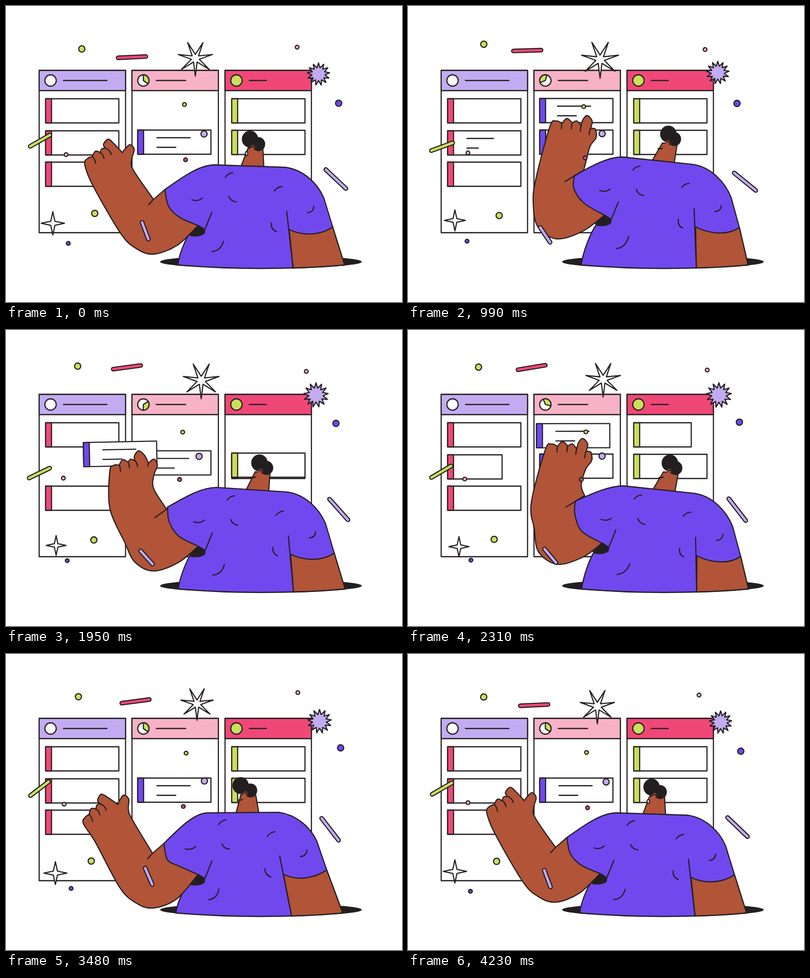
Recreate the animation shown at these times as an HTML page with a canvas. Size 800x600 px, loop 4.26 s.

```html
<!DOCTYPE html>
<html lang="en">
<head>
<meta charset="utf-8">
<title>Task board</title>
<style>
html, body { margin: 0; width: 100%; height: 100%; overflow: hidden; background: #fff; }
canvas { display: block; }
</style>
</head>
<body>
<canvas id="stage" width="800" height="600"></canvas>
<script>
const ctx = document.getElementById('stage').getContext('2d');
const INK = '#231f20', LILAC = '#c3abf2', PINK = '#f7b2c7', RED = '#ef4877',
      GREEN = '#c9df5c', PURPLE = '#7148ee', SKIN = '#b15438', WHITE = '#fff';
const LOOP = 4260, LINE = 2.3, DEG = Math.PI / 180;

const clamp = v => Math.min(1, Math.max(0, v));
const ramp = (t, a, b) => clamp((t - a) / (b - a));
const smooth = (t, a, b) => { const u = ramp(t, a, b); return u * u * (3 - 2 * u); };

// ---- drawing helpers ----
function paint(fill, stroke = true) {
  if (fill) { ctx.fillStyle = fill; ctx.fill(); }
  if (stroke) ctx.stroke();
}
function line(x1, y1, x2, y2) {
  ctx.beginPath(); ctx.moveTo(x1, y1); ctx.lineTo(x2, y2); ctx.stroke();
}
function arc(x1, y1, cx, cy, x2, y2) {
  ctx.beginPath(); ctx.moveTo(x1, y1); ctx.quadraticCurveTo(cx, cy, x2, y2); ctx.stroke();
}
function box(x, y, w, h, fill) {
  ctx.beginPath(); ctx.rect(x, y, w, h); paint(fill);
}
function oval(x, y, rx, ry, fill, stroke) {
  ctx.beginPath(); ctx.ellipse(x, y, rx, ry, 0, 0, 7); paint(fill, stroke);
}
function spline(pts, corners, fill) {
  const n = pts.length, at = i => pts[(i + n) % n], sharp = i => corners.includes(i % n);
  ctx.beginPath();
  ctx.moveTo(...pts[0]);
  for (let i = 0; i < n; i++) {
    const p = at(i), q = at(i + 1);
    const o = sharp(i) ? p : at(i - 1), r = sharp(i + 1) ? q : at(i + 2);
    ctx.bezierCurveTo(p[0] + (q[0] - o[0]) / 6, p[1] + (q[1] - o[1]) / 6,
                      q[0] - (r[0] - p[0]) / 6, q[1] - (r[1] - p[1]) / 6, ...q);
  }
  ctx.closePath();
  paint(fill);
}

// ---- board ----
function card(x, y, color, w = 148, h = 49, len1 = 0, len2 = 0, indent = 39) {
  if (w < 2 || h < 2) return;
  box(x, y, w, h, WHITE);
  box(x, y, Math.min(12, w), h, color);
  if (len1 > 1) line(x + indent, y + 15.5, x + indent + len1, y + 15.5);
  if (len2 > 1) line(x + indent, y + 35, x + indent + len2, y + 35);
}

function panel(x, color, lineEnd) {
  box(x, 130.5, 174.5, 329, WHITE);
  box(x, 130.5, 174.5, 41, color);
  line(x + 49, 151, lineEnd, 151);
}

// A card carried from the first column to the second, later pushed down and collapsed
function traveller(age, slide, shrink, collapse, indent, grows) {
  const lift = ramp(age, 0, 140), s = smooth(age, 140, 950);
  const gone = ramp(age, ...collapse), text = (grows ? lift : 1) * (1 - ramp(age, ...shrink));
  ctx.save();
  ctx.translate(80 - 3 * lift + 189 * s,
                253 + 4.5 * lift - 70 * s + 64 * smooth(age, ...slide) + 49 * gone);
  ctx.rotate(-2 * DEG * lift * (1 - s));
  card(0, 0, s < 0.3 ? RED : PURPLE, 148, 49 * (1 - gone), 67 * text, 38 * text, indent);
  ctx.restore();
}

function board(t) {
  panel(67, LILAC, 204);
  panel(254.5, PINK, 363);
  panel(442.5, RED, 526);
  oval(90, 151, 11.5, 11.5, WHITE);
  oval(465.5, 151, 11.5, 11.5, GREEN);
  oval(277.5, 151, 11.5, 11.5, WHITE);
  const turn = 2 * Math.PI * (smooth(t, 650, 1190) + smooth(t, 1800, 2400)) - Math.PI / 2;
  ctx.beginPath();
  ctx.moveTo(277.5, 151);
  ctx.arc(277.5, 151, 11.5, turn, turn + 2.2);
  ctx.closePath();
  paint(GREEN);

  card(80, 188, RED);
  card(80, 316.5, RED);
  if (t < 10) card(80, 253, RED);
  else if (t < 1450) {
    card(80, 253, RED, 148 * smooth(t, 500, 865), 49,
         67 * ramp(t, 750, 1050), 38 * ramp(t, 810, 1110));
  } else card(80, 253, RED, 148 * smooth(t, 2000, 2465));

  card(456, 252, GREEN);
  if (t < 1985) card(456, 188 + 64 * smooth(t, 1700, 1985), GREEN);
  else card(456, 188, GREEN, 148 * smooth(t, 1985, 2450));

  const ageA = (t - 10 + LOOP) % LOOP, ageB = (t - 1450 + LOOP) % LOOP;
  const a = () => traveller(ageA, [1545, 2040], [2610, 2910], [2780, 3030], 36, true);
  const b = () => traveller(ageB, [1320, 1800], [3810, 4110], [3920, 4200], 39, false);
  if (ageA < ageB) { b(); a(); } else { a(); b(); }
}

// ---- figure ----
// Each pose: lean, rise, tilt, head shift, fist, hand x/y/turn, arm x/y, sleeve tip x/y
const POSES = [
  { time: 0,    v: [0, 0, 0, 0, 0, 0, 0, 0, 0, 0, 0, 0] },
  { time: 990,  v: [11, -16, 15, 33, 1, 0, 0, 0, 0, 0, 0, 0] },
  { time: 1590, v: [-7, -2, -3, 2, 0, -15, 1, -10, -3, -1, -2, 0] },
  { time: 2310, v: [14, -6, 15, 36, 1, -9, -2, 0, 2, 3, -5, 8] },
  { time: 2820, v: [10, -18, 14, 35, 0, 14, -10, -5, 18, -12, 21, -16] },
  { time: 3480, v: [-14, 0, -9, -19, 0, -8, 14, -12, -2, 12, 0, 2] },
];

// Cubic interpolation round the loop that comes to rest at turning points
function poseAt(t) {
  const n = POSES.length, i = POSES.findLastIndex(p => p.time <= t);
  const key = j => POSES[(j + n) % n].v;
  const time = j => POSES[(j + n) % n].time + LOOP * Math.floor(j / n);
  const span = time(i + 1) - time(i), u = (t - time(i)) / span;
  return key(i).map((from, k) => {
    const slope = j => {
      const [a, b, c] = [key(j - 1)[k], key(j)[k], key(j + 1)[k]];
      return (b - a) * (c - b) <= 0 ? 0 : (c - a) / (time(j + 1) - time(j - 1)) * span;
    };
    return from + (key(i + 1)[k] - from) * u * u * (3 - 2 * u)
      + slope(i) * u * (1 - u) ** 2 - slope(i + 1) * u * u * (1 - u);
  });
}

const pairs = list => list.flatMap((x, i) => i % 2 ? [] : [[x, list[i + 1]]]);
// Arm outlines run from the shoulder over the hand and elbow to the sleeve; last is the elbow fold
const OPEN = pairs([321,372, 298,392, 257,332, 254,311, 259,291, 251,281, 243,287, 235,297, 219,280,
  207,270, 197,280, 200,288, 193,290, 190,297, 181,294, 174,305, 165,309, 159,321, 175,363,
  231,460, 262,491, 298,503, 346,485, 388,445, 350,428, 328,405, 288,403]);
const FIST = pairs([336,344, 355,333, 359,317, 368,284, 380,267, 379,251, 374,248, 369,248, 372,233,
  362,222, 353,231, 350,243, 341,233, 332,237, 321,228, 311,238, 299,233, 286,246, 258,352,
  253,400, 262,447, 300,472, 352,457, 397,424, 356,400, 335,370, 317,356]);
const ARM_CORNERS = [0, 1, 7, 11, 13, 15, 23];
const mix = (a, b, u) => a + (b - a) * u;

function armOutline(fist, handX, handY, turn, armX, armY, tipX, tipY) {
  const cx = mix(205, 330, fist), cy = mix(300, 250, fist);
  const cos = Math.cos(turn * DEG), sin = Math.sin(turn * DEG);
  return OPEN.map(([ox, oy], i) => {
    const x = mix(ox, FIST[i][0], fist), y = mix(oy, FIST[i][1], fist);
    if (i > 1 && i < 19) {
      const dx = x - cx, dy = y - cy;
      return [cx + dx * cos - dy * sin + handX, cy + dx * sin + dy * cos + handY];
    }
    return i === 23 || i === 24 ? [x + tipX, y + tipY] : [x + armX, y + armY];
  });
}

function head(t, shift, lift) {
  const at = (x, y, weight) => [x + shift * weight, y + lift];
  const eye = at(486, 299, 0.7), ear = at(499, 288, 0.8);
  ctx.beginPath();
  ctx.moveTo(...at(473, 330, 0.5));
  ctx.lineTo(...at(489, 288, 0.75));
  ctx.lineTo(...at(519, 290, 0.75));
  ctx.lineTo(...at(521, 330, 0.5));
  paint(SKIN);
  oval(...at(493, 270, 1), 15.5, 16, INK);
  oval(...at(510, 280, 0.85), 12.5, 13, INK);
  oval(...ear, 5, 6, SKIN, false);
  arc(ear[0] - 3, ear[1] - 2, ear[0] + 5, ear[1] - 6, ear[0] + 3, ear[1] + 3);
  if (t < 200 || t > 3950) oval(...eye, 2.5, 4, WHITE);
  else arc(eye[0] - 4, eye[1], eye[0], eye[1] + 2.5, eye[0] + 5, eye[1] - 1);
}

function figure(t) {
  const [lean, rise, tilt, shift, ...reach] = poseAt(t), fist = reach[0];
  const arm = armOutline(...reach), crease = arm.pop();
  // The torso sways from its base and tips around the neck
  const warp = (x, y) => [x + lean * clamp((560 - y) / 130),
                          y + (rise + tilt * (x - 422) / 210) * clamp((525 - y) / 70)];
  const fold = (...pts) => arc(...pairs(pts).flatMap(p => warp(...p)));
  const [shoulder, tip, sleeve] = [arm[0], arm[23], arm[25]];
  const off = (x, y) => [tip[0] + x, tip[1] + y];
  const neck = warp(422, 322), top = warp(565, 327), right = warp(642, 389), cuff = warp(660, 448);
  const inner = warp(572, 453), hem = warp(580, 531), left = warp(347, 525), foot = warp(684, 525);

  oval(515, 518.5, 202.5, 11.5, INK);
  head(t, shift, rise + 0.38 * tilt);

  // torso, running on beneath the raised arm
  const dx = neck[0] - shoulder[0], dy = neck[1] - shoulder[1];
  const rx = right[0] - top[0], ry = right[1] - top[1];
  ctx.beginPath();
  ctx.moveTo(...shoulder);
  ctx.bezierCurveTo(shoulder[0] + 0.38 * dx, shoulder[1] + 0.55 * dy,
                    neck[0] - 0.3 * dx, neck[1], ...neck);
  ctx.lineTo(...top);
  ctx.bezierCurveTo(top[0] + 0.45 * rx, top[1] + 0.08 * ry,
                    right[0] - 0.17 * rx, right[1] - 0.5 * ry, ...right);
  ctx.lineTo(...cuff);
  ctx.lineTo(...foot);
  ctx.quadraticCurveTo(515, 539, ...left);
  ctx.bezierCurveTo(left[0] + 4, 495, 369, 460, ...off(-16, 18));
  ctx.lineTo(...off(-40, 8));
  ctx.lineTo(sleeve[0] - 12, sleeve[1] + 10);
  ctx.closePath();
  paint(PURPLE);

  // resting arm
  ctx.beginPath();
  ctx.moveTo(...inner);
  ctx.bezierCurveTo(inner[0] + 26, inner[1] + 13, cuff[0] - 26, cuff[1] + 18, ...cuff);
  ctx.lineTo(...foot);
  ctx.quadraticCurveTo((foot[0] + hem[0]) / 2, 530, ...hem);
  ctx.closePath();
  paint(SKIN);
  line(...warp(567, 416), ...hem);

  // shirt folds
  fold(443, 347, 449, 339, 458, 338);
  fold(376, 393, 388, 397, 397, 389);
  fold(450, 386, 455, 397, 465, 397);
  fold(542, 375, 548, 367, 557, 366);
  fold(609, 419, 621, 418, 622, 406);
  fold(536, 440, 535, 453, 546, 457);
  fold(416, 498, 434, 496, 439, 477);

  // raised arm
  spline([tip, off(12, 8), off(11, 17), off(-3, 21), off(-16, 18)], [0], INK);
  line(...off(28, -27), ...off(13, 10));
  spline(arm, ARM_CORNERS, SKIN);
  line(...arm[1], ...crease);
  const knuckle = (i, openX, openY, fistX, fistY) => {
    const [x, y] = arm[i], w = mix(openX, fistX, fist), h = mix(openY, fistY, fist);
    arc(x, y, x + 0.7 * w, y + 0.2 * h, x + w, y + h);
  };
  knuckle(7, 0, 0, -3, 13);
  knuckle(11, 13, 13, -2, 11);
  knuckle(13, 8, 12, -2, 12);
  knuckle(15, 7, 14, -1, 11);
}

// ---- floating confetti: every value swings as [middle, reach, phase in degrees] ----
const confetti = [];
const drift = (waves, draw) => confetti.push(t => draw(...waves.map(
  ([mid, reach, phase]) => mid + reach * Math.cos((360 * t / LOOP - phase) * DEG))));

const dot = (color, r, ...waves) => drift(waves, (x, y) => oval(x, y, r, r, color));
const stick = (color, half, ...waves) => drift(waves, (x, y, angle) => {
  const c = half * Math.cos(angle * DEG), s = half * Math.sin(angle * DEG);
  for (const [width, ink] of [[9.4, INK], [5, color]]) {
    ctx.lineWidth = width;
    ctx.strokeStyle = ink;
    line(x - c, y - s, x + c, y + s);
  }
  ctx.lineWidth = LINE;
  ctx.strokeStyle = INK;
});
const star = (color, n, ratio, start, ...waves) => drift(waves, (x, y, r) => {
  ctx.beginPath();
  for (let i = 0; i < 2 * n; i++) {
    const a = start * DEG + i * Math.PI / n, d = i % 2 ? r * ratio : r;
    ctx.lineTo(x + d * Math.cos(a), y + d * Math.sin(a));
  }
  ctx.closePath();
  paint(color);
});

const BIG = 6.3, SMALL = 3.8;
dot(GREEN, BIG, [148.3, 6.5, 42], [80.5, 7.5, 330]);
dot(PINK, SMALL, [597, 9.8, 155], [83, 5.3, 85]);
dot(PURPLE, BIG, [670, 6, 290], [192.5, 6.5, 45]);
dot(LILAC, BIG, [395.5, 6, 320], [257.5, 2, 30]);
dot(GREEN, SMALL, [359.3, 4.6, 285], [203.3, 3.8, 165]);
dot(RED, SMALL, [356.5, 6.3, 8], [307.3, 4.4, 0]);
dot(PINK, SMALL, [118.3, 4, 38], [301.2, 3.5, 270]);
dot(GREEN, BIG, [177.5, 6.8, 75], [422.7, 3.3, 135]);
dot(PURPLE, SMALL, [125.6, 6.4, 272], [474, 7.4, 15]);
stick(RED, 28, [250.7, 11, 290], [89.5, 14.2, 357], [-5.6, 4.6, 50]);
stick(LILAC, 28, [667.5, 13.5, 95], [357.5, 6.7, 185], [47, 8.2, 245]);
stick(GREEN, 23, [68, 1, 45], [281, 9.5, 147], [-29, 9, 95]);
stick(LILAC, 18, [283.5, 6.6, 250], [457.5, 7, 107], [59, 11, 340]);
star(WHITE, 7, 0.23, 90, [388.5, 6, 178], [103.7, 5, 60], [36, 2.5, 100]);
star(LILAC, 13, 0.58, -90, [629.2, 4.2, 300], [134.9, 3.2, 355], [23.8, 1.4, 215]);
star(WHITE, 4, 0.25, 0, [98.4, 5, 220], [439.2, 5, 285], [21.8, 1.9, 335]);

function frame(now) {
  const t = now % LOOP;
  ctx.fillStyle = WHITE;
  ctx.fillRect(0, 0, 800, 600);
  ctx.strokeStyle = INK;
  ctx.lineWidth = LINE;
  ctx.lineJoin = ctx.lineCap = 'round';
  board(t);
  figure(t);
  confetti.forEach(draw => draw(t));
}

const began = performance.now();
(function tick() {
  frame(Math.max(0, performance.now() - began));
  requestAnimationFrame(tick);
})();
</script>
</body>
</html>
```
